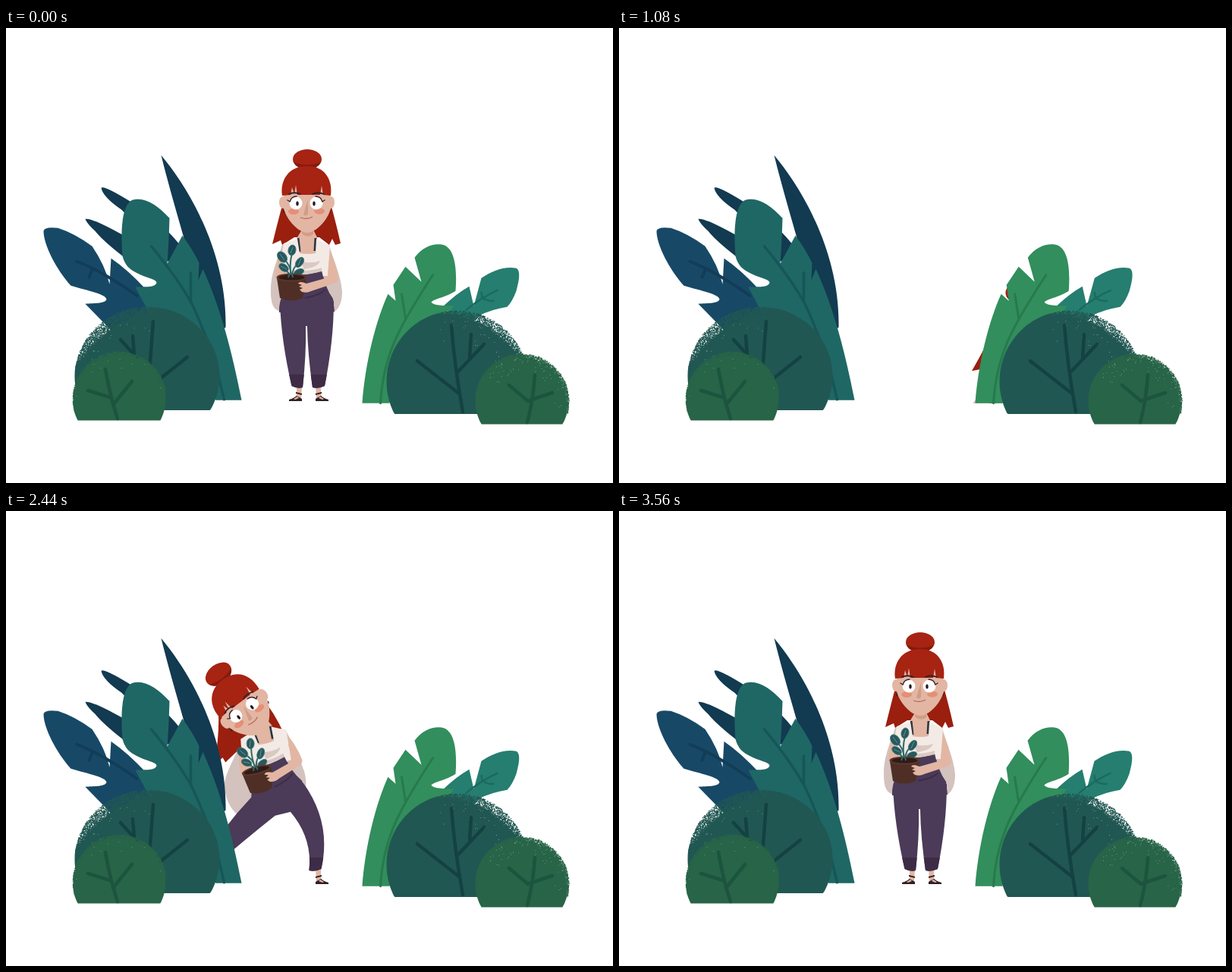
Animation of 800x600 px, one loop 3760 ms. Source, as an HTML page:

```html
<!DOCTYPE html>
<html lang="en">
<head>
<meta charset="utf-8">
<title>Hide and seek in the garden</title>
<style>
  html, body { margin: 0; width: 100%; height: 100%; overflow: hidden; background: #fff; }
  svg { display: block; width: 100%; height: 100%; }
  .vein { fill: none; stroke-linecap: round; stroke-linejoin: round; }
  .skin { fill: #e2b6a2; }
  .shade { fill: #cf9d89; }
  .hair { fill: #a72312; }
  .pants { fill: #4b3a58; }
  .ink { fill: none; stroke: #35202a; stroke-linecap: round; }
  .stem { fill: none; stroke: #2f6a68; stroke-width: 2; }
  .sprout ellipse { fill: #28585d; stroke: #3f7d7a; stroke-width: .8; }
</style>
</head>
<body>
<svg viewBox="0 0 800 600">
  <defs>
    <clipPath id="ground"><path d="M0 0H800V495H0Z"/></clipPath>
    <clipPath id="hem"><path d="M0 457H800V480H0Z"/></clipPath>
    <g id="shoe">
      <path class="skin" d="M383 472H390L389 488L376 491L383 484Z"/>
      <path d="M373 490Q380 488 383 485L390 489V492H373ZM382 480L390 482V484L382 482Z" fill="#2e2029"/>
      <path class="skin" d="M379 489L384 486L386 488L381 490Z"/>
    </g>
  </defs>

  <g id="girl" clip-path="url(#ground)">
    <g class="body"><path id="cape" fill="#d4c2be"/></g>
    <g class="head"><path id="locks" fill="#9a1f0e"/></g>

    <g id="footL"><use href="#shoe"/></g>
    <g id="footR"><use href="#shoe" transform="translate(798) scale(-1 1)"/></g>
    <path id="legs" class="pants"/>
    <path id="cuffs" fill="#3e2b45" clip-path="url(#hem)"/>

    <g class="body">
      <path class="skin" d="M362 296Q355 312 355 331H368L370 300Z"/>
      <path class="pants" d="M374 325L417 320Q420 342 431 357L433 374L360 375Q359 362 367 345Z"/>
      <path d="M394 356Q412 353 421 345" fill="none" stroke="#3d2d49" stroke-width="2"/>
      <path class="skin" d="M384 276L390 266H405L410 276V302H384Z"/>
      <path class="shade" d="M390 264H405V272Q398 278 390 271Z"/>
      <path d="M385 277L387 295M408 277L407 294" stroke="#2b3544" stroke-width="3"/>
      <path d="M384 278L366 284Q362 300 365 319L378 325Q398 327 416 320L418 328L424 327L427 287L409 278L408 297Q397 299 387 297Z" fill="#f3eae6"/>
      <path d="M390 308Q404 311 414 307Q411 316 392 318ZM378 319Q398 322 416 316V321Q398 326 378 325Z" fill="#dac9c3"/>
      <path class="stem" d="M376 330Q373 312 377 297M376 328Q376 312 365 304M377 328Q377 316 386 310M375 328Q372 320 365 318M378 328Q380 322 387 322"/>
      <g class="sprout">
        <ellipse cx="377" cy="293" rx="5" ry="7" transform="rotate(12 377 293)"/>
        <ellipse cx="364" cy="302" rx="5.5" ry="8" transform="rotate(-38 364 302)"/>
        <ellipse cx="387" cy="309" rx="4.5" ry="7.5" transform="rotate(35 387 309)"/>
        <ellipse cx="366" cy="316" rx="4.5" ry="7" transform="rotate(-55 366 316)"/>
        <ellipse cx="386" cy="322" rx="4" ry="7" transform="rotate(66 386 322)"/>
      </g>
      <path d="M378 289L375 297M361 298L367 306M389 304L385 313M362 314L370 318" stroke="#6fa39c" stroke-width=".8"/>
      <path d="M357 330L361 356Q376 363 391 356L396 330Z" fill="#4f2f25"/>
      <ellipse cx="376.5" cy="329" rx="20" ry="5.5" fill="#5a372b"/>
      <ellipse cx="376.5" cy="329" rx="17" ry="3.6" fill="#2f1b17"/>
      <path class="stem" d="M372 329Q376 318 378 329"/>
      <path class="skin" d="M427 294Q435 310 438 330Q438 335 432 337L402 347Q397 350 390 348L387 345L391 343L386 341L390 339L385 337Q387 333 396 337L421 330L418 327L424 327Z"/>
    </g>

    <g class="head">
      <ellipse class="hair" cx="397" cy="173" rx="19" ry="13"/>
      <path d="M379 177Q397 184 415 177Q411 186 397 186Q383 186 379 177Z" fill="#851a0f"/>
      <ellipse class="skin" cx="365" cy="230" rx="5" ry="8"/>
      <ellipse class="skin" cx="428" cy="230" rx="5" ry="8"/>
      <circle cx="367" cy="242" r="2" fill="#3a2028"/>
      <circle cx="426" cy="242" r="2" fill="#3a2028"/>
      <path class="skin" d="M366 205H427L428 238C424 254 408 270 397 270C386 270 370 254 366 238Z"/>
      <path class="shade" d="M398 226L392 246Q396 249 398 245Z"/>
      <ellipse cx="379" cy="242" rx="7" ry="4" fill="#e58f77"/>
      <ellipse cx="413" cy="241.5" rx="7" ry="4" fill="#e58f77"/>
      <g id="eyes">
        <circle cx="382" cy="231" r="8.5" fill="#fff"/>
        <circle cx="409" cy="231" r="8.5" fill="#fff"/>
      </g>
      <g id="pupils" fill="#241820">
        <ellipse cx="384" cy="231.5" rx="1.7" ry="3"/>
        <ellipse cx="406" cy="231.5" rx="1.7" ry="3"/>
      </g>
      <path class="ink" stroke-width="1.4" d="M371 227L374 229Q376 222 383 222M420 227L417 229Q415 222 408 222"/>
      <path class="hair" d="M364 221C361 200 373 182 397 182C420 182 431 200 428 221L418 220L416 208L414 220H384L382 207L380 219L377 210L375 220Z"/>
      <g id="calm">
        <path class="ink" stroke="#4a1d1d" stroke-width="1.8" d="M373 219Q380 215.500 388 219M404 219Q411 215.500 419 219"/>
        <path d="M388 250Q397 253 404 249" fill="none" stroke="#b5655c" stroke-width="1.2"/>
      </g>
      <g id="worried">
        <path class="ink" stroke-width="1.8" d="M375 218Q382 214 388 214M404 213Q410 213 418 220"/>
        <path d="M387 250Q394 248 400 251Q401 256 395 256Q388 256 387 250Z" fill="#7d1f2a"/>
        <path d="M388 250Q394 248 399 251L398 253H389Z" fill="#fff"/>
      </g>
    </g>
  </g>

  <g transform="translate(.5 .8)">
    <g fill="#123a51">
      <path d="M204 167C240 210 291 295 289 394L280 400L250 336C245 310 220 232 204 167Z"/>
      <path d="M125 210Q128 206 165 229Q205 252 242 302L212 307Q170 258 152 239Q127 222 125 210Z"/>
      <path d="M104 251Q112 249 155 273Q190 292 215 325L180 320Q130 284 117 267Q106 257 104 251Z"/>
    </g>
    <path d="M49 267Q50 261 68 263Q90 270 113 287Q130 312 136 337L138 303Q160 318 184 344L210 400H140L104 363C116 362 130 363 132 357C131 350 108 346 85 339C66 318 49 285 49 267Z" fill="#174966"/>
    <path class="vein" d="M93 307Q125 319 172 352M113 318L109 328" stroke="#113d59" stroke-width="4"/>
    <path d="M153 300C150 262 153 232 166 226C182 221 200 233 215 250Q214 285 212 310L232 273Q246 292 254 309L253 332L259 317C283 370 297 425 310 490H276L186 371L170 341C184 340 196 342 198 335C198 329 174 328 160 314Q155 308 153 300Z" fill="#1f6765"/>
    <path class="vein" d="M191 287Q225 328 244 362Q272 420 287 489M243 322L243 360" stroke="#175658" stroke-width="3.5"/>

    <g id="tealLeaf">
      <path d="M577 365Q594 349 610 340L616 366L626 329C640 320 656 313 672 316C678 319 676 332 672 346Q667 360 660 367Q640 370 622 379L610 395L570 385Z" fill="#257e6f"/>
      <path class="vein" d="M606 371Q625 355 647 345M627 354L626 348M627 355Q635 360 642 359" stroke="#1b6a60" stroke-width="2.5"/>
    </g>
    <g id="greenLeaf">
      <path d="M469 494C473 440 487 385 503 350L513 359L510 338L526 314L547 334L538 302C550 286 566 282 578 286C592 293 594 320 592 346C580 354 562 357 560 361C564 366 580 365 590 366L575 385C545 420 515 450 505 494Z" fill="#328e5c"/>
      <path class="vein" d="M562 325Q534 368 520 395Q496 440 493 494M521 350L526 382" stroke="#277a4c" stroke-width="3"/>
    </g>
  </g>
  <g id="bushes"></g>
</svg>

<script>
const LOOP = 3760;
const $ = id => document.getElementById(id);
const set = (el, name, value) => el.setAttribute(name, value);

// Seeded random numbers for the sprayed bush edges
let seed = 7;
const rand = () => (seed = seed * 16807 % 2147483647) / 2147483647;

function add(attrs) {
  const el = document.createElementNS('http://www.w3.org/2000/svg', 'path');
  for (const key in attrs) set(el, key, attrs[key]);
  $('bushes').append(el);
}

// Ellipse with a flat base; between angles a0 and a1 the rim dissolves into specks
function bush({ cx, cy, rx, ry, base, fill, a0, a1, depth, vein, veinFill, glints }) {
  const place = (deg, k) => {
    const a = deg * Math.PI / 180;
    return [cx + rx * k * Math.cos(a), Math.min(base, cy + ry * k * Math.sin(a))];
  };
  const fade = deg => {
    const k = (deg - a0) / (a1 - a0);
    return k > 0 && k < 1 ? depth * Math.sin(Math.PI * k) ** .6 : 0;
  };
  const angle = () => a0 + (a1 - a0) * rand();
  const dot = ([x, y], s) => `M${x.toFixed(1)} ${y.toFixed(1)}h${s}v${s}h-${s}z`;
  const rim = [];
  let spray = '', light = '';
  for (let deg = 90; deg < 450; deg += 2) rim.push(place(deg, 1 - fade(deg)).map(v => v.toFixed(1)));
  const specks = (a1 - a0) * rx * depth * 1.9;
  for (let i = 0; i < specks; i++) {
    const deg = angle();
    spray += dot(place(deg, 1 - fade(deg) * (1.1 - 1.1 * rand() ** 1.4)), (.6 + rand()).toFixed(1));
  }
  for (let i = 0; i < glints; i++) light += dot(place(angle(), 1 - depth - .3 * rand() ** 2), .8);
  add({ d: 'M' + rim.join('L') + 'Z', fill });
  add({ d: spray, fill });
  add({ d: light, fill: '#8fb5a4' });
  add({ d: vein, class: 'vein', stroke: veinFill, 'stroke-width': 4.5 });
}

const deep = { fill: '#215752', veinFill: '#144242' };
const moss = { fill: '#286447', veinFill: '#1c543f' };
bush({ ...deep, cx: 186, cy: 459, rx: 95.5, ry: 91.6, base: 504, a0: 188, a1: 285, depth: .17, glints: 15,
  vein: 'M194 387L190 440L184 500M151 411L170 432L188 450M167 406L169 431M239 434L186 476' });
bush({ ...moss, cx: 149, cy: 488.5, rx: 61.5, ry: 62, base: 517.5, a0: 165, a1: 350, depth: .08, glints: 10,
  vein: 'M131 450Q137 485 147 515M166 466L141 497M108 478L137 487' });
bush({ ...deep, cx: 594.5, cy: 466, rx: 93, ry: 93.6, base: 509, a0: 250, a1: 350, depth: .13, glints: 40,
  vein: 'M587 392Q591 445 602 506M542 439L597 482M630 417L594 455M613 404L611 434' });
bush({ ...moss, cx: 680, cy: 491.5, rx: 61.5, ry: 62.4, base: 522.5, a0: 215, a1: 375, depth: .09, glints: 60,
  vein: 'M697 457Q695 490 687 520M720 481L690 491M663 471L688 492' });

// Motion rules
const unit = (t, t0, t1) => Math.min(1, Math.max(0, (t - t0) / (t1 - t0)));
const smooth = k => k * k * (3 - 2 * k);
const launch = k => k * k;
const arc = (t, t0, t1, height) => height * Math.sin(Math.PI * unit(t, t0, t1));
const spring = (t, t0, t1, amp, waves) => {
  const k = unit(t, t0, t1);
  return amp * (1 - k) * Math.sin(2 * Math.PI * waves * k);
};

const GONE = 1120, BACK = 2120;
const rest = { x: 0, y: 0, lean: 0, tilt: 0, drop: 0, swing: 0, cape: 0, footL: 0, footR: 0, knee: 4, gaze: 0, wide: 0 };
const scared = { wide: .12 };
const step = { ...scared, x: -7, y: 1, lean: -3.5, tilt: -2.5, cape: -8, footR: 40, knee: 2 };
const dive = { ...scared, x: 185, y: 260, lean: 6, swing: 16, cape: -22, footL: 190, footR: 200, knee: 10 };
const behind = { x: -209, y: 31, footL: -209, footR: -209, gaze: 3 };
const reach = { x: -38, y: 7, lean: -14, tilt: -23, drop: 13, swing: 25, cape: -20, footL: -135, knee: 24, gaze: 3 };
const lookDown = { gaze: 4 };

// Start of each pose and the easing that leads into it
const poses = [
  [0, {}], [240, {}], [320, scared], [600, scared], [880, step], [900, step], [GONE, dive, launch],
  [BACK, behind], [2440, reach], [2500, reach], [2740, lookDown], [3240, lookDown], [3360, {}], [LOOP, {}]
];

function poseAt(t) {
  const i = Math.max(1, poses.findIndex(([start]) => start > t));
  const [t0, from] = poses[i - 1], [t1, to, ease = smooth] = poses[i];
  const k = ease(unit(t, t0, t1)), p = {};
  for (const key in rest) {
    const a = from[key] ?? rest[key], b = to[key] ?? rest[key];
    p[key] = a + (b - a) * k;
  }
  const startle = unit(t, 40, 560);
  p.y += 16 * (.5 + startle) * Math.sin(2 * Math.PI * startle) + arc(t, 2500, 2760, -27) + spring(t, 2760, 3000, 7, 1);
  p.swing += spring(t, 40, 600, 4, 1) + spring(t, 2700, 3560, -25, 1);
  p.cape += spring(t, 2700, 3560, 42, 1);
  p.tilt += spring(t, 2700, 3300, -3, 1);
  p.liftL = arc(t, 960, 1100, 14) + arc(t, 2520, 2740, 12);
  p.liftR = arc(t, 640, 840, 9) + arc(t, 940, 1100, 14) + arc(t, 2180, 2420, 16);
  return p;
}

function turn(x, y, deg, cx, cy, grow = 1) {
  const a = deg * Math.PI / 180, c = Math.cos(a) * grow, s = Math.sin(a) * grow;
  return [cx + (x - cx) * c - (y - cy) * s, cy + (x - cx) * s + (y - cy) * c];
}

function locksPath(swing) {
  const grow = 1 + Math.max(0, swing) * .005;
  const r = (x, y, k = 1) => turn(x, y, swing * k, 397, 225, grow).map(v => v.toFixed(2)).join(' ');
  return `M372 205Q${r(362, 240, .5)} ${r(351, 285)}L${r(362, 280)}L${r(364, 286)}L${r(380, 276)}`
    + `L${r(413, 276)}L${r(426, 286)}L${r(430, 278)}L${r(434, 286)}L${r(441, 284)}Q${r(431, 240, .5)} 420 205Z`;
}

function capePath(c) {
  const l = 349 + c * (c > 0 ? .3 : 1), r = 443 + c * (c > 0 ? 1 : .3);
  const yl = 374 + Math.max(0, -c) * .8, yr = 376 + Math.max(0, c) * .45;
  return `M364 286C358 305 ${l - 1} 325 ${l} 348C${l} 368 ${l + 6} ${yl} 366 ${yl}L424 ${yr}`
    + `C${r - 6} ${yr} ${r} 365 ${r} 347C${r - 2} 325 431 305 426 286Z`;
}

function legsPath(p) {
  const at = (x, y) => { const q = turn(x, y, p.lean, 396, 365); return [q[0] + p.x, q[1] + p.y]; };
  const bend = (a, b, k) => `Q${(a[0] + b[0]) / 2 + k} ${(a[1] + b[1]) / 2 - 4} ${b}`;
  const gap = 1 + Math.abs(p.footR - p.footL) * .07;
  const hipL = at(361, 362), hipR = at(432, 360);
  const forkL = at(396 - gap, 393), forkR = at(396 + gap, 393);
  // Trouser ends lag behind the ankles as the legs slant
  const endL = p.footL - .12 * (p.footL - p.x), endR = p.footR - .12 * (p.footR - p.x);
  const yl = 473 - p.liftL, yr = 473 - p.liftR;
  const outL = [376.5 + endL, yl - 1], inL = [391 + endL, yl + 1];
  const outR = [420 + endR, yr - 1], inR = [404 + endR, yr + 1];
  return `M${hipL}${bend(hipL, outL, -6)}Q${384 + endL} ${yl + 3} ${inL}${bend(inL, forkL, 3)}`
    + `L${forkR}${bend(forkR, inR, p.knee - 7)}Q${412 + endR} ${yr + 3} ${outR}${bend(outR, hipR, p.knee + 2)}Z`;
}

const bodies = document.querySelectorAll('.body'), heads = document.querySelectorAll('.head');
const start = performance.now();

function draw() {
  const t = (performance.now() - start) % LOOP;
  const p = poseAt(t);

  const worried = t >= 280 && t < GONE;
  set($('girl'), 'visibility', t >= GONE && t < BACK ? 'hidden' : 'visible');
  set($('worried'), 'display', worried ? 'inline' : 'none');
  set($('calm'), 'display', worried ? 'none' : 'inline');

  const body = `translate(${p.x} ${p.y}) rotate(${p.lean} 396 365)`;
  const head = `${body} translate(0 ${p.drop}) rotate(${p.tilt} 397 272)`;
  bodies.forEach(el => set(el, 'transform', body));
  heads.forEach(el => set(el, 'transform', head));
  set($('locks'), 'd', locksPath(p.swing));
  set($('cape'), 'd', capePath(p.cape));
  const legs = legsPath(p);
  set($('legs'), 'd', legs);
  set($('cuffs'), 'd', legs);
  set($('footL'), 'transform', `translate(${p.footL} ${-p.liftL})`);
  set($('footR'), 'transform', `translate(${p.footR} ${-p.liftR})`);
  set($('pupils'), 'transform', `translate(0 ${p.gaze})`);
  set($('eyes'), 'transform', `translate(395.5 231) scale(${1 + p.wide}) translate(-395.5 -231)`);

  // Leaves spring back after she brushes past
  const sway = spring(t, 1080, 1600, -2.3, 1.5);
  set($('greenLeaf'), 'transform', `translate(0 495) skewX(${2 * sway}) translate(0 -495)`);
  set($('tealLeaf'), 'transform', `translate(0 385) skewX(${7.4 * sway}) translate(0 -385)`);
  requestAnimationFrame(draw);
}
draw();
</script>
</body>
</html>
```
